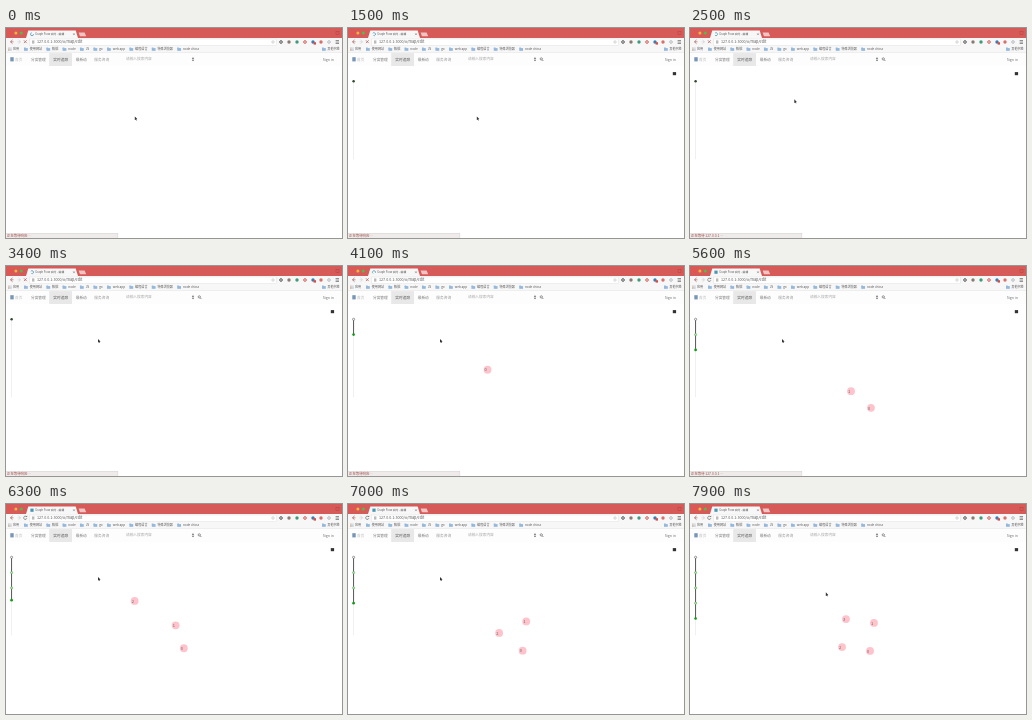
An HTML page with a canvas that plays this animation: 336 by 210 pixels, repeating every 8 s.

```html
<!DOCTYPE html>
<html lang="zh">
<head>
<meta charset="utf-8">
<title>Timeline graph</title>
<style>
html, body { margin: 0; width: 100%; height: 100%; overflow: hidden; background: #fff; }
canvas { display: block; width: 336px; height: 210px; }
</style>
</head>
<body>
<canvas id="stage"></canvas>
<script>
const W = 336, H = 210, LOOP = 8000;
const canvas = document.getElementById('stage');
const ctx = canvas.getContext('2d');
const ratio = window.devicePixelRatio || 1;
canvas.width = W * ratio;
canvas.height = H * ratio;

const FONT = '"Noto Sans CJK SC", "Noto Sans CJK", "Open Sans", sans-serif';
const FIRST = 3500, STEP = 1200, SLIDE = 500, SETTLE = 800;
const RAIL_X = 5.6, RAIL_TOP = 53.3, RAIL_GAP = 15.3;
const LOADED = 5450;

const ENTRY = { x: 121, y: 86 };
const MS_PER_PX = 16;
// Ring for one, two, three and four nodes; turn is the angle of node 0 in degrees.
const RINGS = [
  { x: 169, y: 132, r: 0, turn: 0 },
  { x: 171, y: 133.5, r: 13, turn: 40 },
  { x: 168, y: 131, r: 17, turn: 67 },
  { x: 168, y: 131, r: 20, turn: 53 }
];
const SLOTS = [0, -1, 1, 2];

const POINTER = { x: 128.8, y: 88.5 };
const GLIDES = [
  { at: 2200, ms: 300, x: 104.3, y: 71.3 },
  { at: 2500, ms: 400, x: 92, y: 73 },
  { at: 7600, ms: 300, x: 135.8, y: 88.3 }
];

const clamp = v => Math.max(0, Math.min(1, v));
const smooth = v => { const u = clamp(v); return u * u * (3 - 2 * u); };
const mix = (a, b, p) => ({ x: a.x + (b.x - a.x) * p, y: a.y + (b.y - a.y) * p });

function rect(x, y, w, h, fill) {
  ctx.fillStyle = fill;
  ctx.fillRect(x, y, w, h);
}

function arc(x, y, r, from, to, color, width) {
  ctx.beginPath();
  ctx.arc(x, y, r, from, to);
  ctx.strokeStyle = color;
  ctx.lineWidth = width;
  ctx.stroke();
}

function dot(x, y, r, fill) {
  ctx.beginPath();
  ctx.arc(x, y, r, 0, Math.PI * 2);
  ctx.fillStyle = fill;
  ctx.fill();
}

function ring(x, y, r, color, width = 0.6) {
  arc(x, y, r, 0, Math.PI * 2, color, width);
}

function line(points, color, width = 0.6) {
  ctx.beginPath();
  points.forEach(([x, y]) => ctx.lineTo(x, y));
  ctx.strokeStyle = color;
  ctx.lineWidth = width;
  ctx.stroke();
}

function shape(points, fill) {
  ctx.beginPath();
  points.forEach(([x, y]) => ctx.lineTo(x, y));
  ctx.closePath();
  ctx.fillStyle = fill;
  ctx.fill();
}

function cross(x, y, r, color, width) {
  line([[x - r, y - r], [x + r, y + r]], color, width);
  line([[x + r, y - r], [x - r, y + r]], color, width);
}

// Draws a label and returns its width.
function text(str, x, y, size, color, align = 'left') {
  ctx.font = `${size}px ${FONT}`;
  ctx.textAlign = align;
  ctx.textBaseline = 'middle';
  ctx.fillStyle = color;
  ctx.fillText(str, x, y);
  return ctx.measureText(str).width;
}

function arrow(x, dir, color) {
  line([[x + dir, 11.9], [x - dir, 13.8], [x + dir, 15.7]], color, 0.7);
  line([[x - dir, 13.8], [x + 2 * dir, 13.8]], color, 0.6);
}

function folder(x) {
  rect(x, 19.6, 1.8, 1, '#7fa8d0');
  rect(x, 20.1, 3.8, 2.7, '#93b8dc');
}

function tabBar(t) {
  rect(0, 0, W, 10, '#d65b58');
  ['#ee5049', '#f1b53c', '#50bd48'].forEach((c, i) => dot(4.5 + i * 5.4, 5.1, 1.5, c));
  shape([[20, 10], [22.3, 2.6], [69.7, 2.6], [72, 10]], '#f8f7f7');
  shape([[74, 8.2], [72.6, 4.4], [78.6, 4.4], [80.2, 8.2]], '#efc4c2');
  if (t < LOADED) {
    const a = t / 150;
    arc(26, 6.2, 1.5, a, a + 4.5, '#4898b4', 0.8);
  } else {
    rect(24.4, 4.6, 3.2, 3.2, '#4898b4');
  }
  text('Graph Flow 实时 - 编辑', 29.3, 6.4, 2.8, '#555');
  cross(68, 6.2, 0.9, '#666', 0.5);
  ctx.strokeStyle = '#b1413d';
  ctx.lineWidth = 0.5;
  ctx.strokeRect(330, 3.5, 3, 3);
}

function toolbar(t) {
  rect(0, 10, W, 15, '#f8f7f7');
  arrow(5.5, 1, '#a0524e');
  arrow(13.5, -1, '#ccc');
  if (t < LOADED) {
    cross(19.3, 13.7, 1.4, '#a85a55', 0.7);
  } else {
    arc(19.3, 13.8, 1.6, 0.3, 5.5, '#666', 0.7);
    shape([[19.7, 13.1], [21.2, 13.1], [21.2, 11.6]], '#666');
  }
  rect(23.5, 11, 247, 6.2, '#fff');
  ctx.strokeStyle = '#dddbdb';
  ctx.lineWidth = 0.4;
  ctx.strokeRect(23.5, 11, 247, 6.2);
  rect(26, 12.4, 2.4, 3.2, '#bbb');
  text('127.0.0.1:3000/#/map/edit', 31, 14, 3.7, '#555');
  ring(267, 14, 1.2, '#aaa', 0.5);

  const icons = ['#555', '#8a7a72', '#3f9a7c', '#d45a55', '#347fb8', '#d8706a', '#b5bcc0'];
  icons.forEach((color, i) => {
    const x = 275 + i * 8;
    if (i % 3) dot(x, 14, 1.7, color);
    else ring(x, 14, 1.3, color, 1);
  });
  rect(307.6, 14.2, 2.4, 2.4, '#d84c45');
  for (let i = 0; i < 3; i++) rect(329.6, 12.2 + i * 1.5, 3.4, 0.7, '#666');
}

function bookmarks() {
  for (let i = 0; i < 9; i++) {
    dot(2.6 + (i % 3) * 1.2, 20 + Math.floor(i / 3) * 1.2, 0.45, ['#cf665d', '#6b9e68', '#5b88bb'][i % 3]);
  }
  text('应用', 7, 21.2, 3.1, '#555');
  const names = ['使用网站', '数据', 'node', 'JS', 'go', 'web app', '编程语言', '特殊浏览器', 'node china'];
  let x = 18;
  for (const name of names) {
    folder(x);
    x += 10 + text(name, x + 5.7, 21.2, 3.1, '#555');
  }
  folder(316);
  text('其他书签', 321.3, 21.2, 3.1, '#555');
  rect(0, 24.7, W, 0.4, '#d8d6d6');
}

function navigation(t) {
  rect(0, 25.1, W, 12.9, '#fdfdfd');
  rect(43.2, 25.1, 22.8, 12.9, '#e8e8e8');
  rect(4.3, 29.2, 3.4, 4.2, '#7795b6');
  text('首页', 9, 31.4, 3.7, '#bbb');
  let x = 25;
  ['分类管理', '实时追踪', '最新动', '服务咨询'].forEach((name, i) => {
    x += 7.6 + text(name, x, 31.4, 3.7, i === 1 ? '#555' : i === 3 ? '#999' : '#777');
  });
  text('请输入搜索内容', 120, 31, 3.7, '#aaa');
  shape([[185.8, 30.8], [187, 29.2], [188.2, 30.8]], '#555');
  shape([[185.8, 31.7], [187, 33.3], [188.2, 31.7]], '#555');
  if (t >= 150) {
    ring(193.3, 30.9, 1.15, '#555', 0.6);
    line([[194.2, 31.8], [195.4, 33]], '#555', 0.7);
  }
  text('Sign in', 328, 31.4, 3.6, '#777', 'right');
}

function timeline(t, count) {
  if (t < 150) return;
  rect(324.8, 44.1, 3.3, 3.1, '#333');
  rect(RAIL_X - 0.3, RAIL_TOP, 0.6, 78, '#e6e6e6');
  if (!count) {
    dot(RAIL_X, RAIL_TOP, 1.25, '#2d4a2d');
    return;
  }
  const slide = clamp((t - FIRST - (count - 1) * STEP) / SLIDE);
  const head = RAIL_TOP + RAIL_GAP * (count - 1 + slide);
  rect(RAIL_X - 0.45, RAIL_TOP, 0.9, head - RAIL_TOP, '#484848');
  for (let i = 0; i < count; i++) {
    const y = RAIL_TOP + RAIL_GAP * i;
    dot(RAIL_X, y, 1.1, i ? '#b9e5b5' : '#fff');
    ring(RAIL_X, y, 1.1, i ? '#3fa53c' : '#444', 0.5);
  }
  dot(RAIL_X, head, 1.35, '#119c16');
}

function place(i, count) {
  const { x, y, r, turn } = RINGS[count - 1];
  const angle = (turn + SLOTS[i] * 360 / count) * Math.PI / 180;
  return { x: x + r * Math.cos(angle), y: y + r * Math.sin(angle) };
}

// The newest node drifts in from the entry point while the others make room.
function nodeAt(i, count, age) {
  const goal = place(i, count);
  if (i < count - 1) return mix(place(i, count - 1), goal, smooth(age / SETTLE));
  const travel = MS_PER_PX * Math.hypot(goal.x - ENTRY.x, goal.y - ENTRY.y);
  return mix(ENTRY, goal, smooth(clamp(age / travel) ** 1.5));
}

function graph(t, count) {
  const age = t - FIRST - (count - 1) * STEP;
  for (let i = 0; i < count; i++) {
    const { x, y } = nodeAt(i, count, age);
    dot(x, y, 3.9, '#ffc3cc');
    text(String(i), x - 3, y + 0.2, 4, '#666');
  }
}

function status(t) {
  if (t >= 5750) return;
  rect(0, 205, 112, 5, '#efebeb');
  rect(0, 205, 112, 0.4, '#cfcccc');
  rect(111.7, 205, 0.4, 5, '#cfcccc');
  const busy = (t > 2200 && t < 3100) || t > 4900;
  text(busy ? '正在等待 127.0.0.1…' : '正在等待响应…', 1, 207.6, 3.4, '#9c4a46');
}

function cursor(t) {
  const { x, y } = GLIDES.reduce((p, g) => mix(p, g, clamp((t - g.at) / g.ms)), POINTER);
  shape([[x, y], [x, y + 3.6], [x + 2.5, y + 2.6]], '#333');
  line([[x + 1, y + 2.6], [x + 1.7, y + 4]], '#333', 0.6);
}

function draw(now) {
  const t = now % LOOP;
  const count = Math.max(0, Math.min(RINGS.length, Math.floor((t - FIRST) / STEP) + 1));
  ctx.setTransform(ratio, 0, 0, ratio, 0, 0);
  rect(0, 0, W, H, '#fff');
  tabBar(t);
  toolbar(t);
  bookmarks();
  navigation(t);
  timeline(t, count);
  graph(t, count);
  status(t);
  cursor(t);
}

let start = null;
function frame(now) {
  if (start === null) start = now;
  draw(Math.max(0, now - start));
  requestAnimationFrame(frame);
}
draw(0);
requestAnimationFrame(frame);
</script>
</body>
</html>
```
